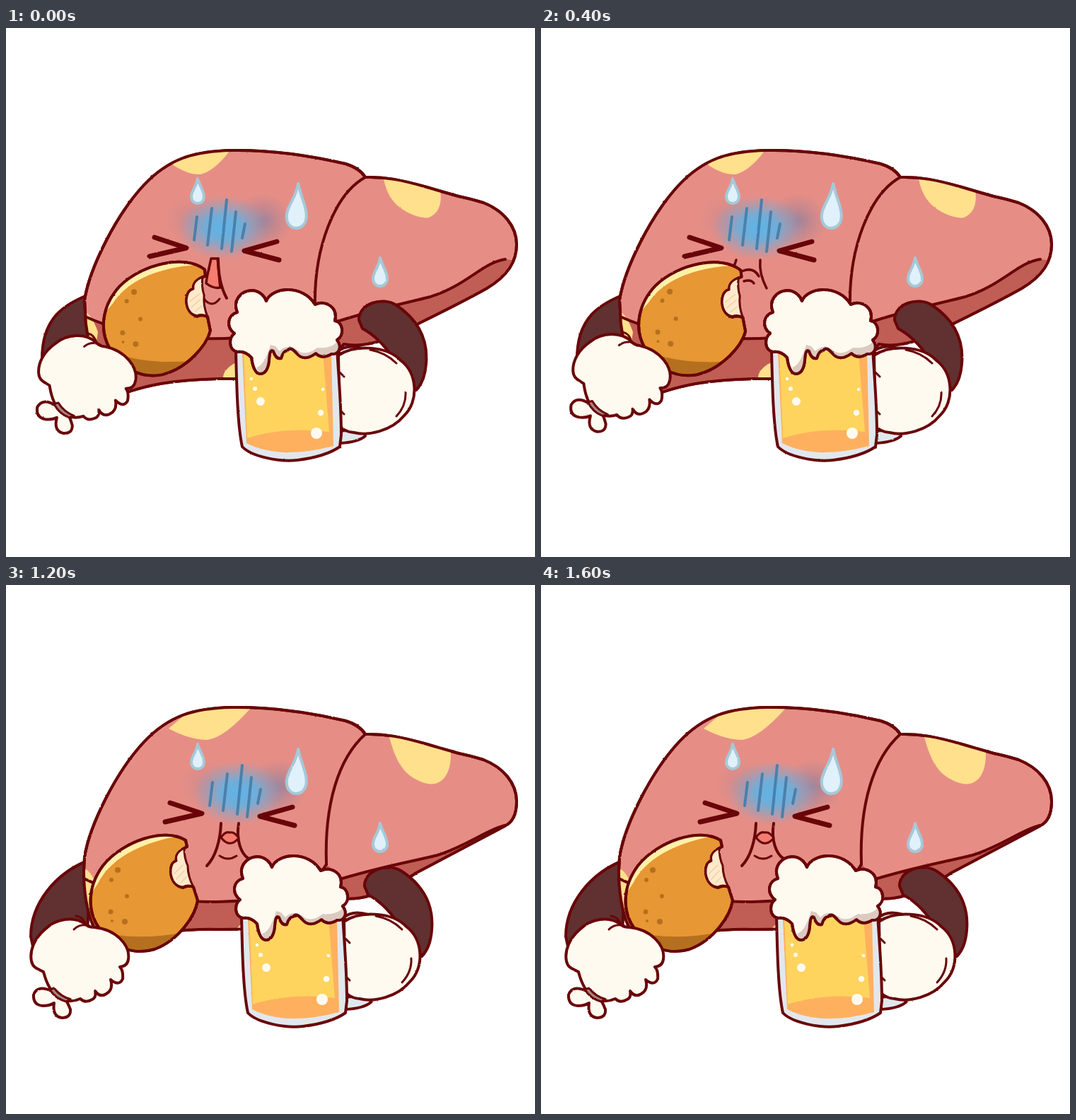
An HTML page for the animation above (1800 ms loop, 748 px wide and 748 px high).

```html
<!DOCTYPE html>
<html lang="en">
<head>
<meta charset="utf-8">
<title>Overfed liver</title>
<style>
html, body { margin: 0; width: 100%; height: 100%; overflow: hidden; background: #fff; }
svg { display: block; width: 100vw; height: 100vh; }
</style>
</head>
<body>
<svg viewBox="0 0 748 748">
  <defs>
    <filter id="rough" x="0" y="0" width="748" height="748" filterUnits="userSpaceOnUse" color-interpolation-filters="sRGB">
      <feTurbulence type="fractalNoise" baseFrequency=".25" numOctaves="1" seed="4"/>
      <feDisplacementMap in="SourceGraphic" scale="2" xChannelSelector="R" yChannelSelector="G"/>
    </filter>
    <radialGradient id="blue">
      <stop offset="0" stop-color="#5cb4e8"/>
      <stop offset=".4" stop-color="#66b0e0" stop-opacity=".9"/>
      <stop offset="1" stop-color="#8fa0c0" stop-opacity="0"/>
    </radialGradient>
    <radialGradient id="mauve">
      <stop offset="0" stop-color="#8a7d9c" stop-opacity=".75"/>
      <stop offset="1" stop-color="#a08098" stop-opacity="0"/>
    </radialGradient>
  </defs>
  <g id="stage" filter="url(#rough)" stroke-linecap="round" stroke-linejoin="round"></g>
</svg>
<script>
const INK = '#690508', CREAM = '#fffaf0', PINK = '#e68e86', RED = '#c05e56', SPOT = '#ffe08c',
  ARM = '#613030', GLASS = '#e1e7ee', BEER = '#fed45f', AMBER = '#feb05f', MEAT = '#e79733', BROWN = '#b5701f';

const shape = (d, fill = 'none', width = 4, stroke = INK) =>
  `<path d="${d}" fill="${fill}" stroke="${stroke}" stroke-width="${width}"/>`;
const flat = (d, fill) => shape(d, fill, 0);
const oval = (x, y, rx, ry, fill, width = 0) =>
  `<ellipse cx="${x}" cy="${y}" rx="${rx}" ry="${ry}" fill="${fill}" stroke="${INK}" stroke-width="${width}"/>`;
const dots = (list, fill) => list.map(([x, y, r]) => oval(x, y, r, r, fill)).join('');
const group = (inner, transform) => `<g transform="${transform}">${inner}</g>`;
const shift = (inner, x, y) => group(inner, `translate(${x} ${y})`);
const clip = (id, d, inner) =>
  `<clipPath id="${id}"><path d="${d}"/></clipPath><g clip-path="url(#${id})">${inner}</g>`;

function body({ left, squash }) {
  const outline = 'M508 211Q500 198 480 192C450 185 390 172 320 173C265 174 230 185 195 222C155 265 118 340 111 385' + (squash
    ? 'L110 405C110 440 118 500 150 510C200 490 260 486 300 487L390 486Q440 478 475 443Q520 448 580 407L705 341C718 335 722 320 722 306'
    : 'L112 400C112 440 130 500 165 517C200 505 230 498 300 496L390 496Q440 488 475 450L478 447Q520 455 585 417Q650 385 680 368C710 350 722 330 722 306')
    + 'C722 280 703 258 675 247Q655 241 640 238Q615 231 595 225C560 215 535 210 508 211Z';
  const seam = left ? 'M508 211C465 235 435 310 437 395'
    : squash ? 'M508 211C470 245 450 310 453 395'
    : 'M508 211C478 235 468 290 464 310S453 370 453 395';
  const belly = squash ? 'M110 415C180 450 300 453 360 443Q430 434 453 395' : 'M112 408C180 440 290 444 360 435Q430 425 ' + (left ? 437 : 453) + ' 395';
  const lobe = squash ? 'M462 419C530 398 570 392 610 382C650 370 680 346 705 340' : 'M462 417C530 395 570 388 600 380C650 365 675 331 706 327';
  const top = squash ? 'M230 203Q260 219 285 219Q310 215 346 174L280 160Z'
    : left ? 'M235 193Q258 208 275 207Q295 202 316 174L260 160Z' : 'M240 193Q265 208 287 207Q305 202 330 174L270 160Z';
  const side = squash ? 'M542 215C550 245 560 265 580 275C608 291 630 277 629 236L580 210Z'
    : 'M534 213Q539 240 556 253C570 264 588 270 598 268C612 262 617 248 614 230L570 205Z';
  return shape(outline, PINK) + clip('skin', outline,
    flat(belly + 'L478 416L478 530L100 540Z', RED) + flat(lobe + 'L730 330L720 420L480 470L455 440Z', RED) +
    oval(left ? 355 : 372, 495, 48, 28, SPOT) + flat('M105 402Q118 396 130 430L122 485L105 490Z', SPOT) +
    flat(top, SPOT) + shift(flat(side, SPOT), left || squash ? 0 : 16, left || squash ? 0 : 4)) +
    shape(belly) + shape(lobe) + shape(seam) + shape(outline);
}

// Mouths are placed relative to the face, whose base is the right-hand position.
const mouths = {
  open: shape('M304 322Q304 345 298 362Q292 378 284 385M330 322Q327 345 331 362Q335 372 341 374') +
    oval(316.5, 346, 13, 22, '#f57c6e', 3.5) + shape('M302 381Q317 397 331 380', 'none', 3.5),
  kiss: shape('M304 325C303 350 296 373 284 385M329 325C325 350 333 368 342 374') +
    shape('M304 345Q310 336 316 338Q323 336 329 346Q316 361 304 345Z', '#f57c6e', 3) +
    shape('M302 371Q314 379 326 371', 'none', 3),
  tug: shape('M312 326C308 345 306 350 305 361Q315 369 325 367C323 352 323 340 321 326Z', '#f57c6e', 3.5) +
    shape('M322 326Q322 360 334 382') + shape('M300 352Q294 374 298 402M302 383Q313 397 324 383', 'none', 3),
  chew: shape('M298 328L295 337M332 328Q330 347 341 368M306 344Q322 337 330 351M309 358Q319 355 323 361', 'none', 3.5)
};

function face(mouth) {
  const stripes = 'M292 267L288 300M313 255L307 307M334 243L327 312M347 260L341 316M360 277L356 297';
  const eyes = 'M232 296L277 311L225 323M405 302L359 315L408 328';
  return oval(385, 273, 42, 40, 'url(#mauve)') + group(oval(283, 270, 40, 36, 'url(#mauve)'), 'opacity=".3') .replace('transform="opacity=".3"', 'opacity=".3"') +
    oval(329, 282, 66, 46, 'url(#blue)') + shape(stripes, 'none', 4, '#4a80ab') +
    shape(eyes, 'none', 7) + mouths[mouth];
}

const drop = (x, y, w, h) => shape(
  `M${x} ${y}C${x + w * .2} ${y + h * .35} ${x + w / 2} ${y + h * .5} ${x + w / 2} ${y + h * .73}` +
  `C${x + w / 2} ${y + h * 1.09} ${x - w / 2} ${y + h * 1.09} ${x - w / 2} ${y + h * .73}` +
  `C${x - w / 2} ${y + h * .5} ${x - w * .1} ${y + h * .35} ${x} ${y}Z`, '#e0f1fb', 4, '#a5c9d8');
const sweat = drop(271, 213, 18, 35) + group(drop(411, 220, 28, 63), 'rotate(3 411 262)') + drop(529, 325, 20, 40);

function drumstick() {
  const ball = 'M256 358L254 349C225 330 165 350 137 385C115 415 114 450 133 475C150 500 180 512 210 503C245 490 268 455 271 434L265 415Q258 412 250 416Q236 413 233 396Q232 381 241 378Q239 366 256 358Z';
  const bite = 'M252 360Q238 367 241 378Q232 381 233 396Q236 414 250 415Q258 411 265 415Q257 400 257 385Q252 374 252 360Z';
  const bone = 'M64 562Q45 553 39 567Q38 582 52 583Q62 583 68 579Q65 598 79 600Q92 600 91 588Q87 578 84 574Z';
  const glove = 'M113 468C96 455 70 460 55 475C40 488 33 505 36 520C38 530 46 531 53 535Q60 562 75 572Q90 580 105 573Q112 580 122 574Q128 571 126 562Q133 572 142 566Q152 560 148 546Q160 556 165 545Q166 533 161 528Q172 527 173 517C176 497 155 475 125 472Q117 472 113 468Z';
  return shape(ball, MEAT) + clip('meat', ball,
    flat('M125 476Q180 493 252 479L220 520L150 520Z', BROWN) +
    flat('M122 422C119 385 170 335 250 342C200 350 150 370 130 410Z', '#fff0a8') +
    dots([[158, 391, 4], [149, 405, 3], [171, 428, 3], [148, 450, 3.5], [168, 464, 4], [150, 463, 2]], BROWN)) +
    shape(ball) + shape(bite, '#ffeacb', 3) +
    shape('M238 396L250 384M241 404L252 392M247 409L255 401', 'none', 1.5, '#f3cfa6') +
    shape(bone, CREAM) + shape(glove, CREAM) + shape('M62 560L68 558Q77 570 92 574L85 577Q70 573 62 560Z', '#a88582', 3) +
    shape('M99 456Q109 457 113 469M96 475Q105 466 118 470', 'none', 3);
}

const leftArm = high => shape(high ? 'M122 375C82 390 50 410 51 470L115 460Z' : 'M120 376C68 395 35 440 35 485L40 508L115 480Z', ARM);

function mug() {
  const cup = 'M333 455C334 500 335 560 342 592C355 606 395 614 420 611Q460 606 480 592L482 575C482 530 478 490 476 452Z';
  const drip = 'Q455 469 446 460Q430 472 420 461Q410 449 406 456Q400 456 397 467Q390 469 386 457Q381 452 380 470Q378 489 367 489Q358 488 355 466Q346 456 335 458';
  const foam = 'M335 458C322 455 323 438 331 432C318 422 322 405 335 402C328 385 340 372 355 371C367 371 374 380 376 386C384 366 428 362 445 391C460 384 478 395 473 414C485 416 487 435 476 441C484 452 478 462 468 461' + drip + 'Z';
  return shape('M476 458Q490 446 512 453L505 470ZM480 587Q505 586 516 577L514 566L480 570Z', GLASS) +
    shape('M507 413C506 390 540 379 560 392C590 412 605 440 602 475Q600 500 588 512L560 475Q540 440 512 425Z', ARM) +
    shape('M478 463C500 447 546 449 566 470C590 488 592 528 571 548C553 570 520 577 500 572Q486 571 480 562Z', CREAM) +
    shape('M523 455Q545 459 560 474M573 515Q574 534 560 549M480 487L486 493M481 541L486 546', 'none', 3) +
    shape(cup, GLASS) + flat('M342 460L348 587Q395 611 471 591L468 458Z', AMBER) +
    flat('M344 455L349 580Q400 563 465 571L456 458Z', BEER) +
    dots([[368, 528, 6], [360, 510, 3], [355, 496, 2.3], [447, 573, 8], [453, 544, 4.3], [456, 511, 2.3]], CREAM) +
    shape(foam, CREAM) + clip('foam', foam, flat('M483 432Q475 455 448 452Q430 466 418 454Q404 447 395 457L389 450L382 448Q373 478 362 480L367 495L490 480Z', '#dccac1')) + shape(foam);
}

function tilted() {
  const cup = 'M211 437L234 288C244 256 285 247 315 249C350 251 382 270 385 290L399 437Z';
  return shape('M497 368Q530 362 560 368C585 374 587 395 575 408C555 425 510 430 470 424Z', ARM) +
    shape('M383 294Q410 290 437 298L420 315L388 312Z', GLASS) +
    shape('M392 340C390 310 420 297 450 297C485 300 500 325 496 348C515 370 510 398 490 412C470 425 440 424 425 400L415 387Q399 383 395 362Z', CREAM) +
    shape('M496 348Q499 365 493 374', 'none', 3) +
    shape('M395 403L450 398Q468 401 466 420Q462 442 445 441L398 441Z', GLASS) +
    shape('M417 400L417 385Q432 379 451 386L456 397Q436 390 423 394', CREAM) +
    shape(cup, GLASS) + clip('glass', cup,
      flat('M238 330L240 285C254 246 362 245 379 288L381 330Z', CREAM) +
      flat('M237 290Q242 310 256 298L244 320L232 315ZM383 290Q378 309 364 298L374 322L388 315Z', '#e6c9bd') +
      flat('M223 400L243 310Q250 291 268 294Q282 285 299 291Q315 281 330 291Q352 284 362 300Q374 300 377 315L388 400Z', AMBER) +
      flat('M241 400L244 315Q252 294 270 297Q284 288 300 294Q316 285 329 295Q350 289 359 304Q368 306 370 322L374 400Z', BEER)) +
    shape(cup) + oval(306, 439, 94, 69, GLASS, 4) + oval(306, 439, 88, 62, AMBER) +
    flat('M241 396Q300 366 371 393C372 423 345 436 309 436C270 436 242 423 241 396Z', BEER) +
    shape('M255 489Q305 505 354 490', 'none', 3, BEER) +
    dots([[276, 314, 7], [342, 321, 2.5], [350, 349, 9.5], [296, 340, 2], [359, 430, 8]], CREAM);
}

const rest = { face: 0, drip: 0, drum: 'translate(0 0)', mug: [0, 0], mouth: 'open' };
const bitten = { ...rest, left: true, face: -22, mug: [-8, 0], drum: 'translate(19.5 -14) rotate(6 195 423)', mouth: 'tug' };
const squashed = { ...rest, squash: true, drip: 12, drum: 'translate(0 12)', mug: [0, 13], mouth: 'kiss' };
const poses = [
  [0, bitten],
  [200, { ...bitten, mouth: 'chew', drip: 4, drum: 'translate(11 -14) rotate(6 195 423)', arm: -8 }],
  [400, { ...bitten, mouth: 'chew', mug: [-7, 0], drum: 'translate(20 -14) rotate(7 195 423)' }],
  [600, { ...rest, drinking: true }],
  [1000, rest],
  [1200, squashed],
  [1400, { ...rest, mouth: 'kiss' }],
  [1600, squashed]
];

function draw(p) {
  return shift(leftArm(p.left), p.arm || 0, p.squash ? 12 : 0) + body(p) + shift(face(p.mouth), p.face, p.drip) +
    shift(sweat, 0, p.drip) + group(drumstick(), p.drum) + (p.drinking ? tilted() : shift(mug(), ...p.mug));
}

const stage = document.getElementById('stage');
let shown;
function tick() {
  const time = performance.now() % 1800;
  const pose = poses.findLast(([start]) => start <= time)[1];
  if (pose !== shown) stage.innerHTML = draw(shown = pose);
  requestAnimationFrame(tick);
}
tick();
</script>
</body>
</html>
```
